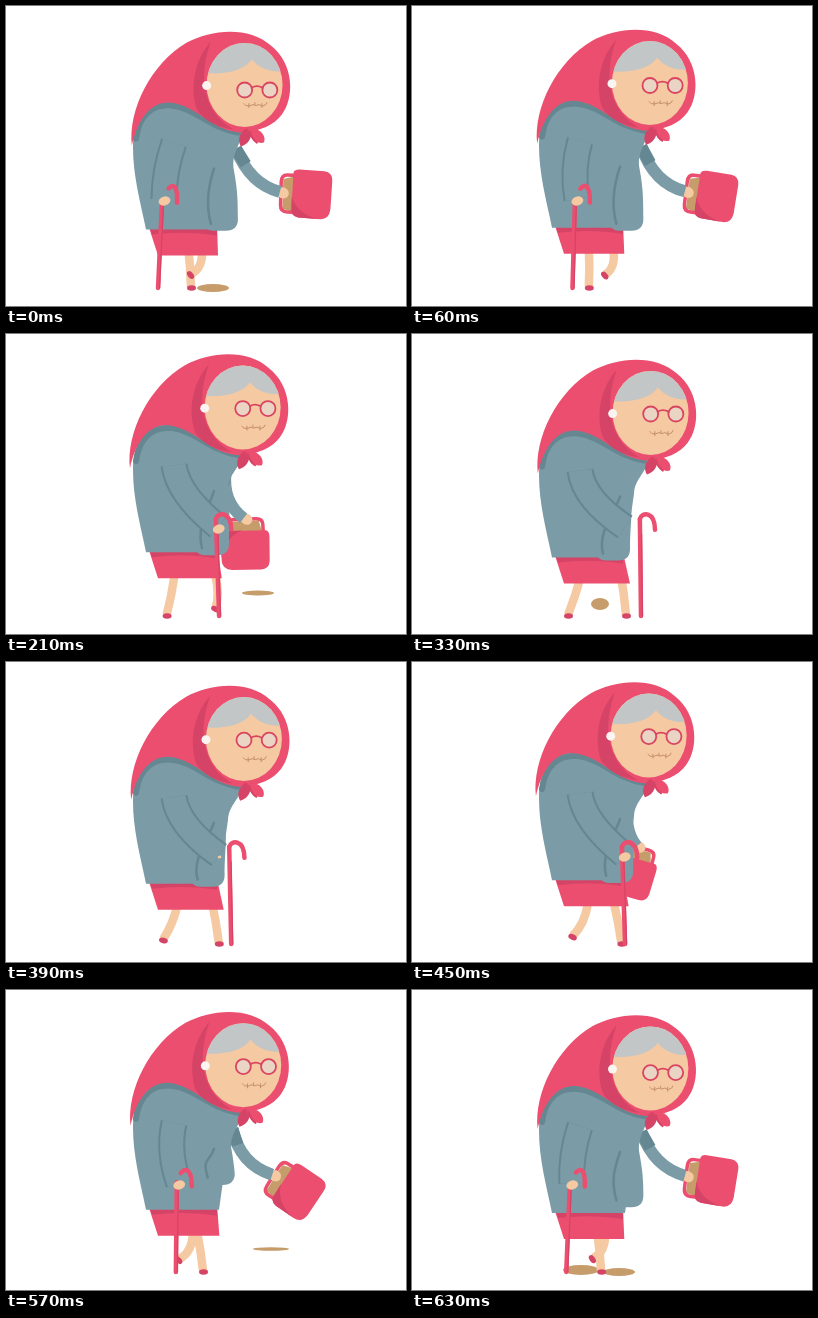
These frames come from a looping animation (400 px wide and 300 px high, 0.66 s). An HTML page with a canvas:

```html
<!DOCTYPE html>
<html lang="en">
<head>
<meta charset="utf-8">
<title>Walking granny</title>
<style>
  html, body { margin: 0; width: 100%; height: 100%; overflow: hidden; background: #fff; }
  canvas { display: block; width: 400px; height: 300px; }
</style>
</head>
<body>
<canvas id="stage" width="400" height="300"></canvas>
<script>
const ctx = document.getElementById('stage').getContext('2d');
const LOOP = 660, STEP = 30, TURN = 2 * Math.PI;
const PINK = '#ec4e6f', ROSE = '#d54466', COAT = '#7b9ca7', SHADE = '#648791',
      SKIN = '#f5c9a1', HAIR = '#c3c6c6', TAN = '#c69c6b', RIM = '#d94460';

// Patches that flash on the ground: time, x, y, rx, ry
const PATCHES = [
  [0, 207, 282, 16, 4],
  [210, 252, 259, 16, 2.5],
  [330, 188, 270, 9, 6],
  [555, 265, 259, 18, 1.7],
  [615, 169, 280, 18, 5]
];

// Cosine that peaks at the given time
const wave = (t, peak, period = LOOP) => Math.cos(TURN * (t - peak) / period);

function fill(path, color) {
  ctx.fillStyle = color;
  ctx.fill(new Path2D(path));
}

function line(path, color, width, cap = 'round') {
  ctx.strokeStyle = color;
  ctx.lineWidth = width;
  ctx.lineCap = cap;
  ctx.lineJoin = 'round';
  ctx.stroke(new Path2D(path));
}

function oval(x, y, rx, ry, color, turn = 0) {
  ctx.beginPath();
  ctx.ellipse(x, y, rx, ry, turn, 0, TURN);
  ctx.fillStyle = color;
  ctx.fill();
}

function moved(x, y, angle, draw) {
  ctx.save();
  ctx.translate(x, y);
  ctx.rotate(angle);
  draw();
  ctx.restore();
}

function ground(t) {
  for (const [at, x, y, rx, ry] of PATCHES) {
    const d = Math.abs(t - at);
    if (Math.min(d, LOOP - d) <= STEP) oval(x, y, rx, ry, TAN);
  }
}

// A leg takes two loops for one stride
function leg(t) {
  const stride = 2 * LOOP;
  const hip = 189 + 21 * wave(t, 260, stride);
  const x = 185 + 29 * wave(t, 330, stride);
  const lift = 13 * Math.max(0, wave(t, 0, stride));
  const y = 281 - lift;
  const knee = (hip + x) / 2 + 1 + lift * 0.5;
  line(`M${hip} 241 Q${knee} 262 ${x} ${y}`, SKIN, 8.5, 'butt');
  moved(x, y, lift * 0.07, () => oval(0.5, 1, 4.5, 2.8, ROSE));
}

function bag(x, y, angle) {
  moved(x, y, angle, () => {
    fill('M2 -14 L14 -17 V19 L2 16Z', TAN);
    line('M16 -18 H6 Q0 -18 0 -11 V12 Q0 19 7 19 H16', PINK, 3.5);
    fill('M12 -21 Q13 -24 18 -24 L43 -23 Q51 -22 51 -14 L50 15 Q49 25 40 25 L18 24 Q10 23 11 14Z', PINK);
    fill('M11 3 Q16 20 38 25 L18 24 Q10 23 11 14Z', ROSE);
  });
}

function farArm(x, y, swing, bob) {
  const sx = 222 + 8 * swing, sy = 143 + bob;
  const ex = 222 + 22 * swing, ey = 170 + 8 * swing;
  oval(x + 2, y, 6, 5.5, SKIN, 0.5);
  line(`M${sx} ${sy} Q${ex} ${ey} ${x - 1} ${y - 1}`, COAT, 12, 'butt');
  line(`M${sx} ${sy} L${sx + (ex - sx) * 0.7} ${sy + (ey - sy) * 0.45}`, SHADE, 12, 'butt');
}

function skirt(swing) {
  const right = 215 - 3 * swing;
  fill(`M142 219 L152 250 H${right} L211 219Z`, PINK);
  fill('M143 219 L146 229 Q180 225 211 230 V219Z', ROSE);
}

// The front of the coat follows the far arm and is lifted as it comes forward
function coat(swing, raise) {
  const x = 225 + 7 * swing, y = 227 - 28 * raise, waist = 223 + 5 * swing;
  fill('M127 142 C127 110 143 94 164 94 C190 95 200 118 236 124 ' +
       'C235 140 223 144 222 160 L213 224 H140 C134 195 127 170 127 142Z', COAT);
  fill(`M190 130 L236 126 C234 142 ${waist - 3} 148 ${waist} 165 C${waist + 3} 182 ${x} 190 ${x} ${y - 12} ` +
       `Q${x} ${y} ${x - 12} ${y} H${x - 24} Q${x - 37} ${y} ${x - 35} ${y - 20}Z`, COAT);
  line(`M208 163 C203 178 ${x - 33} ${y - 28} ${x - 27} ${y - 7}`, SHADE, 2.5);
  line('M130 133 C133 109 147 98 166 100 C190 103 203 122 232 127', SHADE, 6);
}

function nearArm(swing, bob) {
  const bow = 1 - swing * swing, back = Math.max(0, swing), top = 196;
  const x = 192 - 36 * swing + 4 * bow;
  const lean = -1.5 - 2.5 * swing + 4 * bow;
  const hand = Math.min(x + 2, 213);
  const grip = Math.min(6, 12 * (1 + swing));
  const sleeve = `M168 ${137 + bob} Q${118.5 + hand * 0.25} ${166 + bob} ${hand} ${top - 3}`;
  line(sleeve, SHADE, 27, 'butt');
  line(sleeve, COAT, 23, 'butt');
  moved(x, top, -lean / 87, () => {
    line(`M${6 * back} ${-11 - 3 * back} C${2 + 8 * back} -18 15 -19 15 0`, PINK, 4.5);
    line(`M0 ${11 * back - 11} V86`, PINK, 4.5);
    line('M1.5 4 V86', ROSE, 1.2);
  });
  oval(hand + 0.5, top - 1, grip, grip * 0.75, SKIN, -0.3);
}

function hood() {
  fill('M126 140 C122 105 145 58 181 37 C205 24 243 20 265 40 C288 58 289 92 276 109 ' +
       'C268 120 254 125 239 127 C207 128 193 100 164 97 C145 96 132 113 126 140Z', PINK);
  fill('M205 36 C188 55 184 82 191 104 C198 115 212 122 228 124 C206 112 188 84 205 36Z', ROSE);
}

function face(drop) {
  const x = 238.7, y = 79.3, rx = 38, ry = 42;
  oval(x, y, rx, ry, SKIN);
  ctx.save();
  ctx.clip(new Path2D(`M${x - rx} ${y} a${rx} ${ry} 0 0 1 ${2 * rx} 0Z`));
  fill('M196 30 H282 V65 C268 68 254 64 246 54 C238 66 216 70 196 67Z', HAIR);
  ctx.restore();
  oval(200.8, 80, 4.5, 4.5, '#fbf5f2');
  moved(0, drop, 0, () => {
    for (const lens of [238.8, 264]) {
      oval(lens, 80.4, 7.5, 7.5, '#ead5c5');
      ctx.strokeStyle = RIM;
      ctx.lineWidth = 1.8;
      ctx.stroke();
    }
    line('M246 78 Q251 75 256.5 78', RIM, 1.8);
  });
  line('M238 98 L240 100 Q244 101 247 99 L250 100 L253 99 Q257 102 260 99 L261 97 ' +
       'M243 98 V102 M249 97 V99 M256 98 V102', '#c58f6c', 1);
}

function knot() {
  fill('M240 123 C232 129 232 136 235 141 C242 139 246 133 246 125Z', ROSE);
  fill('M242 123 C254 121 261 131 258 137 C250 139 244 132 242 123Z', PINK);
  line('M244 126 Q246 134 251 137', ROSE, 2);
}

function draw(t) {
  const bob = -3.7 + 3.3 * wave(t, 0, LOOP / 2);
  const swing = wave(t, 15), cane = wave(t, 0);
  const bagX = 236.5 + 38.5 * swing + 14 * (1 - swing * swing);
  const bagY = 187 + bob * 0.3;
  const raise = Math.max(0, wave(t, 567)) ** 6;
  const nod = 4 * Math.max(0, cane) ** 6;

  ctx.fillStyle = '#fff';
  ctx.fillRect(0, 0, 400, 300);
  ground(t);
  leg(t + LOOP);
  leg(t);
  bag(bagX, bagY, 1.19 - 1.17 * swing);
  farArm(bagX, bagY, swing, bob);
  moved(0, bob, 0, () => {
    skirt(swing);
    coat(swing, raise);
  });
  nearArm(cane, bob);
  moved(bob * 0.35, bob, 0, () => {
    hood();
    face(nod);
    knot();
  });
}

const start = performance.now();
function tick() {
  const t = (performance.now() - start) % LOOP;
  draw(Math.floor(t / STEP) * STEP);
  requestAnimationFrame(tick);
}
tick();
</script>
</body>
</html>
```
